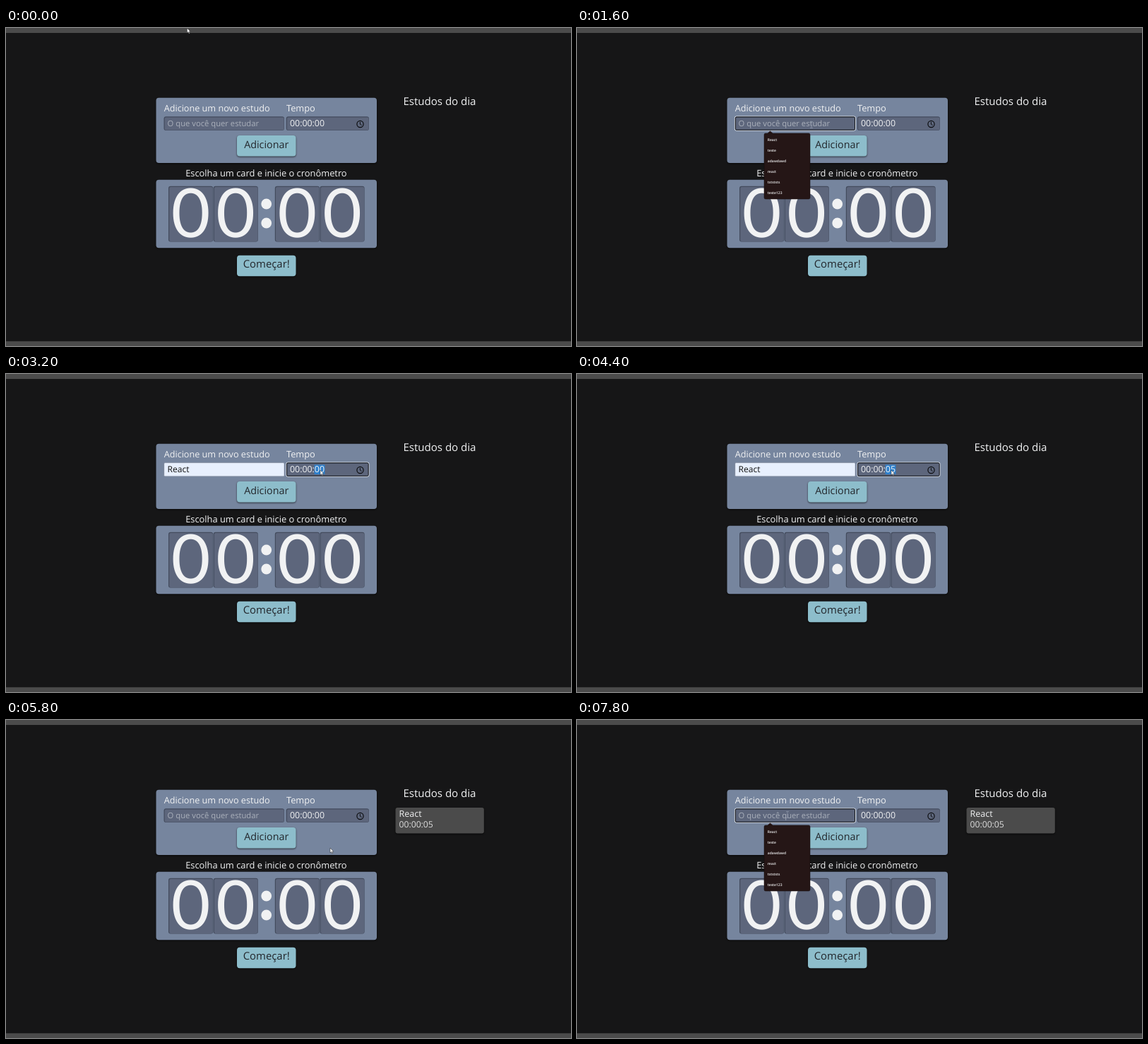
An HTML page for the animation above (8 s loop, 800 by 450 pixels).

```html
<!DOCTYPE html>
<html lang="pt-BR">
<head>
<meta charset="utf-8">
<title>Estudos do dia</title>
<style>
  html, body { margin: 0; width: 100%; height: 100%; overflow: hidden; background: #161617; }
  svg { display: block; width: 100%; height: 100%; }
  text { font-family: "Open Sans", "Noto Sans", sans-serif; fill: #f1f2f3; text-rendering: geometricPrecision; white-space: pre; }
  .digit { font-family: Lato, "Open Sans", sans-serif; }
  .raised { filter: drop-shadow(.6px 1.6px .8px rgba(0, 0, 0, .65)); }
</style>
</head>
<body>
<svg id="stage" viewBox="0 0 800 450"></svg>
<script>
const LOOP = 8000, STEP = 200;
const BG = '#161617', BAR = '#4b4b4b', PANEL = '#76859e', FIELD = '#5d667c', BUTTON = '#8dbdcb', INK = '#22262b';
const stage = document.getElementById('stage');

function add(tag, attrs, parent = stage) {
  const el = document.createElementNS('http://www.w3.org/2000/svg', tag);
  for (const key in attrs) el.setAttribute(key, attrs[key]);
  return parent.appendChild(el);
}
const rect = (x, y, width, height, fill, rx = 0, extra = {}, parent) =>
  add('rect', { x, y, width, height, fill, rx, ...extra }, parent);
function label(x, y, size, str, extra = {}, parent) {
  const el = add('text', { x, y, 'font-size': size, ...extra }, parent);
  el.textContent = str;
  return el;
}
const middle = { 'text-anchor': 'middle' };
const raised = { class: 'raised' };
const show = (el, on) => el.setAttribute('visibility', on ? 'visible' : 'hidden');

function inset(x, y, w, h) {
  rect(x, y, w, h, '#434b5d', 3);
  return rect(x + 1.2, y + 1.2, w - 1.6, h - 1.6, FIELD, 2);
}
function button(y, str, size) {
  rect(327, y, 83.5, 29.5, BUTTON, 4, raised);
  label(368.7, y + 17.6, size, str, { ...middle, style: `fill:${INK}` });
}
function focusRing(x, w) {
  const g = add('g', { fill: 'none', 'stroke-width': 1 });
  add('rect', { x, y: 125, width: w, height: 20.2, rx: 2.2, stroke: '#e4e8ef' }, g);
  add('rect', { x: x + .9, y: 125.9, width: w - 1.8, height: 18.4, rx: 1.6, stroke: '#14161a' }, g);
  return g;
}

// Page
rect(0, 0, 800, 450, BG);
rect(0, 0, 800, 7, BAR);
rect(0, 443.3, 800, 6.7, BAR);

// Form
rect(212.5, 98.7, 312.5, 92.3, PANEL, 4, raised);
label(223.7, 118, 12.65, 'Adicione um novo estudo');
label(397, 118, 12.8, 'Tempo');
inset(223.5, 125.3, 170.5, 19.7);
inset(396.7, 125.3, 117.3, 19.7);
const hint = label(228.6, 138.6, 11.24, 'O que você quer estudar', { style: 'fill:#aab0bb' });
const filled = add('g', {});
rect(223.8, 125.6, 170.2, 19.2, '#e8f0fe', 1.5, { stroke: '#8a93a5', 'stroke-width': .6 }, filled);
label(228.6, 138.8, 12.1, 'React', { style: 'fill:#111' }, filled);
const caret = rect(259.6, 128.6, .8, 13, '#222');
const nameRing = focusRing(223.4, 171);
const timeRing = focusRing(396.7, 117.3);
const picked = rect(436.6, 128.4, 14.8, 13.6, '#2f80cc');
const timeText = label(402, 138.9, 12.36, '');
add('circle', { cx: 501.5, cy: 136, r: 4.6, fill: 'none', stroke: '#0c0d10', 'stroke-width': 1.2 });
add('path', { d: 'M501.4 133v3.2l2.2 1.3', fill: 'none', stroke: '#0c0d10', 'stroke-width': 1 });
button(152, 'Adicionar', 14.3);

// Stopwatch
label(368.4, 210, 12.87, 'Escolha um card e inicie o cronômetro', middle);
rect(212.5, 214.7, 312.5, 96.6, PANEL, 4, raised);
for (const x of [230, 293.6, 380.8, 444.4]) {
  inset(x, 223.7, 63.2, 78.8);
  label(x + 31.6, 296.4, 96, '0', { ...middle, class: 'digit' });
}
for (const cy of [249, 276]) add('circle', { cx: 368.7, cy, r: 7.4, fill: '#f1f2f3' });
button(321.7, 'Começar!', 14.9);

// Study list
label(562.4, 109, 15.05, 'Estudos do dia');
const card = add('g', {});
rect(551.5, 124, 125.3, 36.5, BAR, 3, raised, card);
label(556.5, 137, 12.5, 'React', {}, card);
label(556.5, 152.3, 12.2, '00:00:05', { style: 'fill:#dcdcdc' }, card);

// Suggestions
const menu = add('g', {});
rect(265, 149, 65, 93, '#251616', 2, { stroke: '#120b0b', 'stroke-width': .5 }, menu);
add('path', { d: 'M269.5 149.2l4-3.6 4 3.6z', fill: '#251616' }, menu);
const hover = rect(265.3, 151, 64.4, 14, '#4a3a3a', 0, {}, menu);
['React', 'teste', 'adawdawd', 'react', 'tstststs', 'teste123'].forEach((str, i) =>
  label(269.8, 160 + i * 15, 5, str, { 'font-weight': 600 }, menu));

// Pointer
const arrow = add('path', { d: 'M0 0v7l1.6-1.4 1.1 2.4 1.1-.5-1.1-2.3h2.1z', fill: '#fff', stroke: '#222', 'stroke-width': .5 });
const beam = add('path', { d: 'M-2-4.4h4M0-4.4v8.8M-2 4.4h4', fill: 'none', stroke: '#8b94a6', 'stroke-width': .8 });

// time, x, y
const path = [
  [0, 256.4, 0], [1000, 340, 134], [1400, 340, 134], [1600, 332, 137], [1800, 290, 156],
  [2000, 284, 158], [2200, 384, 142], [2400, 402, 139], [2800, 445, 136], [4400, 445, 136],
  [5000, 384, 166], [5400, 384, 166], [5800, 459, 181], [6200, 470, 186], [6600, 430, 176],
  [7400, 298, 134], [8000, 298, 134]
];
function pointerAt(t) {
  const i = path.findIndex(p => p[0] > t);
  const [t0, x0, y0] = path[i - 1], [t1, x1, y1] = path[i];
  const k = (t - t0) / (t1 - t0);
  return [x0 + (x1 - x0) * k, y0 + (y1 - y0) * k];
}

function draw(time) {
  const t = Math.floor((time % LOOP) / STEP) * STEP;
  const during = (from, to) => t >= from && t < to;
  const hasName = during(2000, 5200);
  show(hint, !hasName);
  show(filled, hasName);
  show(caret, during(2000, 2800));
  show(nameRing, during(1400, 2800) || t >= 7400);
  show(timeRing, during(2800, 5000));
  show(picked, during(2800, 5000));
  show(menu, during(1600, 2000) || t >= 7600);
  show(hover, during(1800, 2000));
  show(card, t >= 5200);
  timeText.textContent = during(3800, 5200) ? '00:00:05' : '00:00:00';

  const [x, y] = pointerAt(t);
  const overName = x > 223 && x < 395 && y > 125 && y < 146;
  for (const el of [arrow, beam]) el.setAttribute('transform', `translate(${x} ${y})`);
  show(arrow, !overName);
  show(beam, overName);
}

const start = performance.now();
function tick() {
  draw(performance.now() - start);
  requestAnimationFrame(tick);
}
tick();
</script>
</body>
</html>
```
